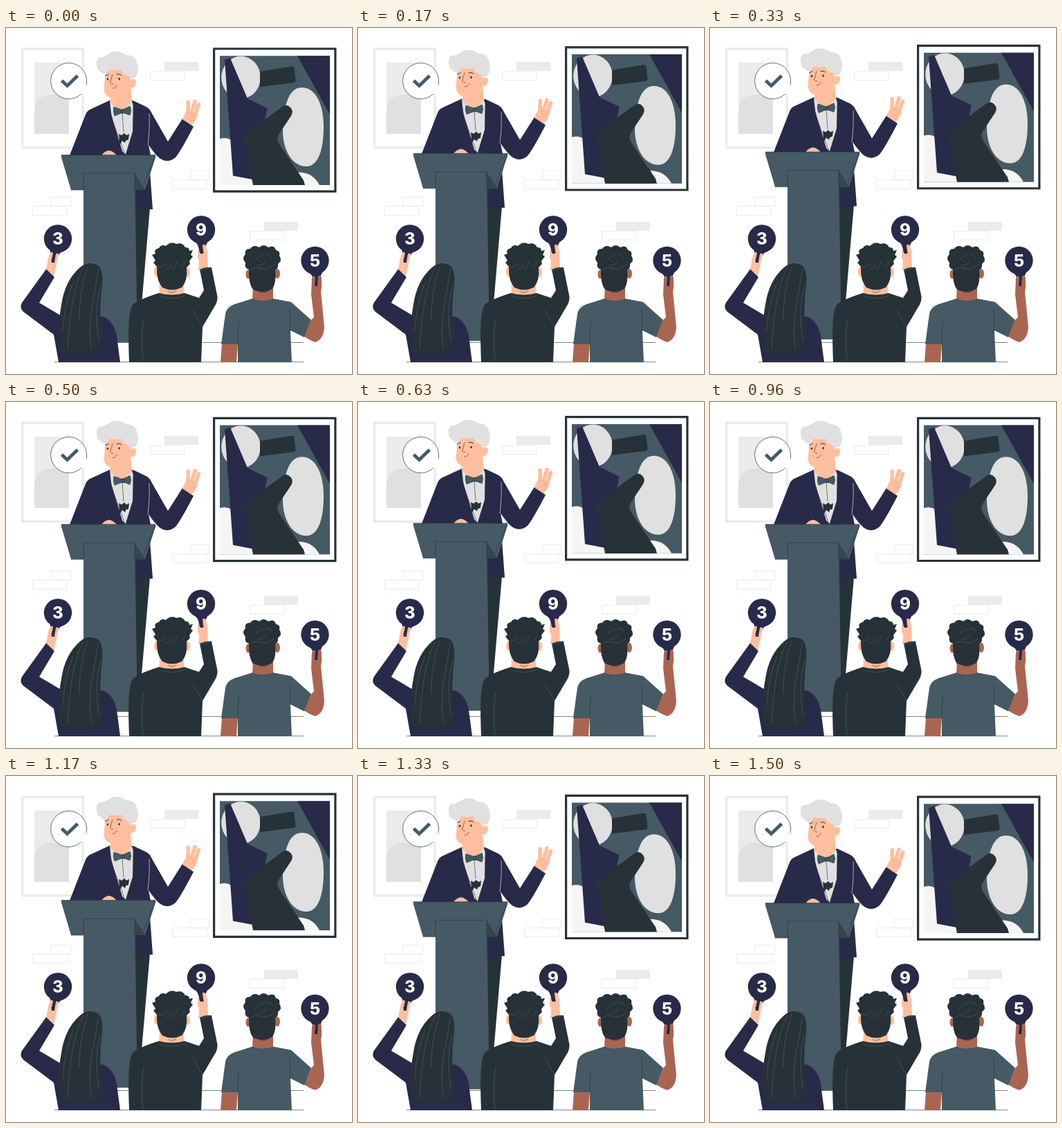
An HTML page for the animation above (1540 ms loop, 500 by 500 pixels).

```html
<!DOCTYPE html>
<html lang="en">
<head>
<meta charset="utf-8">
<title>Auction</title>
<style>
  html, body { margin: 0; height: 100%; overflow: hidden; background: #fff; }
  svg { display: block; width: 100vw; height: 100vh; }
  .slate { fill: #455a64; }
  .dark { fill: #263238; }
  .navy { fill: #282a49; }
  .grey { fill: #e0e0e0; }
  .pale { fill: #f5f5f5; }
  .skin { fill: #ffbe9d; }
  .brown { fill: #aa6550; }
  .line, .soft, .seam, .shade, .feature { fill: none; stroke-width: .6; stroke-linecap: round; }
  .line { stroke: #263238; }
  .soft { stroke: #4d636d; }
  .seam { stroke: #fff; }
  .shade { stroke: #eb996e; }
  .feature { stroke: #263238; stroke-width: 1; }
  .fingers { fill: none; stroke: #ffbe9d; stroke-width: 5.5; stroke-linecap: round; }
  .brick { fill: #fff; stroke: #e6e6e6; stroke-width: .8; }
  .fill { fill: #ebebeb; }
  text { font: 800 24px Inter, "Open Sans", sans-serif; fill: #fff; text-anchor: middle; }
</style>
</head>
<body>
<svg viewBox="0 0 500 500">
  <g id="wall">
    <path class="fill" d="M22 28.500H113V174.500H22Z"/>
    <path fill="#fff" d="M25.500 32H109.500V171H25.500Z"/>
    <path class="fill" d="M41 50H91V153H41Z"/>
    <path class="grey" d="M41 153V120Q42 97 67 96Q82 95 91 105V153Z"/>
    <path class="fill" d="M229 49H278V62H229ZM373 280H422V293H373Z"/>
    <path class="brick" d="M208.500 63H258V75.500H208.500ZM266.500 206.500H293.500V219.500H266.500ZM240.500 219.500H290V232.500H240.500ZM64.500 244.500H94V257.500H64.500ZM38.500 257.500H88V270.500H38.500ZM352.500 293.500H402V306.500H352.500Z"/>
    <path class="line" d="M70 482.700H430M150 454.500H430"/>
  </g>

  <g id="float">
    <g id="painting">
      <path d="M300.600 30H475.900V236.200H300.600Z" fill="#fff" stroke="#263238" stroke-width="3.200"/>
      <path class="slate" d="M309 40.200H468V227H309Z"/>
      <path class="pale" d="M309 160Q318 157 326 162L330 212L357 216V227H309Z"/>
      <path class="pale" d="M414 209Q442 205 453 227H425Z"/>
      <ellipse class="grey" cx="339.500" cy="71.500" rx="28.300" ry="30.700"/>
      <path class="navy" d="M421 40.200H468V125ZM316 46L324 43.500L349 102L377.500 116L374 134L343 155L357 219L328 213.500Z"/>
      <path class="dark" d="M367 63L412 55.500Q416 55 416.500 58L418.500 76Q418.500 78.500 416 79L367 85Z"/>
      <path class="grey" d="M427 86C450 86 459 115 459 143C459 176 451 200 434 200C413 200 400 176 400 148C401 115 407 87 427 86Z"/>
      <path class="dark" d="M343 155L399 114Q406 109 411 115Q416 120 412 127L394 154Q390 160 395 168L430 220L432 227H357Z"/>
    </g>

    <g id="auctioneer">
      <path class="dark" d="M184 255L208 260L196 400L192 454H184Z"/>
      <path class="navy" d="M180 180H206L212 262H184Z"/>
      <path class="navy" d="M150 104.500L124 116.500Q117 119 115 125L92 184H209L206 169Q219 188 226 190.500Q236 195 245 187Q252 179 271 142.500L255 131L234 164L210 122Q208 117 203 114L184 105Z"/>
      <path class="grey" d="M150 105L181 103L184 112L183 150L173 183L168 178L152 125Z"/>
      <path class="line" d="M168 123L170 150M148 107L154 134L172 183M184 107V148L173 183"/>
      <path class="seam" d="M207 124Q208 145 205 169"/>
      <path class="skin" d="M146 57L179 57L180 75Q188 71 188 79Q187 87 180 86L182 106L168 121L151 108V101Q142 98 141.500 88L143 72Z"/>
      <path class="grey" d="M131.500 57Q129 46 135 42Q141 43 146 39Q153 33 163 34Q169 35 173 39Q187 39 189 50Q194 60 187 72Q183 71 180 75L177 69Q169 68 167 60Q156 62 150 60Q147 63 146 69Q139 66 135 62Q132 61 131.500 57Z"/>
      <path class="feature" d="M143.500 69L148 67M160 67Q163 65.500 166.500 68"/>
      <path class="line" d="M154 67L150.500 79Q152 81.500 155 81M154 87Q158 88 160 83"/>
      <ellipse class="dark" cx="147" cy="74" rx="1.200" ry="1.700"/>
      <ellipse class="dark" cx="163.500" cy="73.500" rx="1.200" ry="1.700"/>
      <path class="slate" stroke="#263238" stroke-width=".6" d="M167 118L156 114Q154 120 157 127L167 123L171 123L179 126Q182 119 179 113L171 117Z"/>
      <path class="line" d="M167 118H171V123H167Z"/>
      <path class="skin" d="M255 132Q257 126 260 121L277 122Q277 133 268 140.500Z"/>
      <path class="fingers" d="M263 123L263.300 107M268 122L273 106M274 123L278.500 110.500"/>
      <path class="shade" d="M263 122Q268 120 272 125M268 131L273 126"/>
      <path class="dark" d="M163 153L167 155L171 152L174 155L178 153L177 161L173 163L172 166L168 163L165 168L161 166L164 161Z"/>
      <path class="skin" d="M138 184Q142 178 149 177Q155 178 160 184Z"/>
    </g>

    <g id="podium">
      <path class="dark" d="M186 210L201 234H188L191 454H184Z"/>
      <path class="slate" d="M80 183.500H216V187L201 234H94L80 187Z"/>
      <path fill="#34454d" d="M186 210L201 234H186Z"/>
      <path class="slate" d="M112 210H186L190 454.500H112Z"/>
      <path class="line" d="M80 183.500H216M94 234H112V210H186V234M90 184L94 187M216 185L199 226"/>
    </g>
  </g>

  <g id="bubble">
    <circle cx="90.700" cy="76.500" r="26" fill="#fff" stroke="#263238" stroke-width=".7"/>
    <path fill="#fff" d="M117 83Q115 90 118 95.500Q113 94 109 96L106 90L113 81Z"/>
    <path d="M80.500 76L88.500 83.500L103.500 69" fill="none" stroke="#455a64" stroke-width="4.800"/>
  </g>

  <g id="woman">
    <path class="skin" d="M57 352L62 330Q65 322 69 323L75 326L73 342L68 363Z"/>
    <path class="navy" d="M58 348.500L70 360L48 397L80 416L140 417Q155 422 160 445L165 483H76L69 443L25 410Q19 404 23 397Z"/>
    <path class="dark" d="M107 346Q119 336 133 343Q141 350 139 372Q135 400 137 425Q140 453 138 465Q133 469 127 467Q122 475 111 472Q96 475 77 468Q74 430 80 400Q85 365 107 346Z"/>
    <path class="soft" d="M112 346Q94 375 89 464M118 344Q105 385 106 421M133 350Q128 385 124 402Q119 430 123 463M136 375Q127 410 134 452M97 367Q84 400 82 438"/>
    <path class="line" d="M69 443L77 456M145 450L148 482"/>
  </g>

  <g id="bidder">
    <path class="skin" d="M278 350Q280 337 277 326Q278 313 284 312Q288 309 291 323L292 349Z"/>
    <path class="skin" d="M222 370H257V388Q240 394 221 388Z"/>
    <ellipse class="skin" cx="217.500" cy="352.500" rx="3.500" ry="7"/>
    <ellipse class="skin" cx="262.500" cy="353" rx="3.500" ry="7"/>
    <path class="dark" d="M178 483Q175 414 182 402Q186 394 221 383Q240 388 258 383L279 390L286 379L280 349Q288 345 297 346L305.500 388Q306 396 301 403L284 432L282 483Z"/>
    <path class="dark" d="M218 345L213 339L216 336L211 328L216 326Q213 320 221 318Q224 312 231 315Q238 308 246 312Q255 309 259 317Q265 317 265 322L270 321L267 328L270 330L265 337L266 341L261 346Q263 365 254 375Q240 382 226 375Q217 365 218 345Z"/>
    <path class="soft" d="M219 345Q230 347 231 339M232 348Q238 347 240 340M239 349Q246 345 247 338M253 346Q258 344 258 338M220 387Q240 394 259 387M198 482Q194 445 199 420M284 432L270 407M281 350L293 347"/>
    <path class="line" d="M235 381Q240 384 246 380"/>
  </g>

  <g id="buyer">
    <path class="brown" d="M357 370H386V392Q370 400 356 393ZM312 456H335L333 483H310ZM431 446L441 422L445 418L441 385L442 362Q447 352 454 358Q458 369 455 381L460 432Q459 450 447 454Q438 451 431 446Z"/>
    <ellipse class="brown" cx="350" cy="356" rx="3.500" ry="6.500"/>
    <ellipse class="brown" cx="392" cy="355" rx="4" ry="7"/>
    <path class="slate" d="M311 457L317 413Q319 402 334 398L356 391Q370 397 386 391L412 396L441 422L431 447L411 437L413 483H335V457Z"/>
    <path class="dark" d="M351 349Q344 347 346 339Q340 333 346 327Q344 319 353 319Q358 312 366 317Q372 311 379 317Q388 313 390 321Q397 322 395 329Q400 336 393 341Q394 347 389 350Q391 368 385 377Q371 385 357 378Q350 369 351 349Z"/>
    <path class="soft" d="M354 349Q362 344 368 348Q378 350 388 342M360 337Q364 328 372 329M376 327Q382 326 384 331M364 343Q373 343 376 336"/>
    <path class="line" d="M335 457L336 425M411 437L410 408M366 381Q372 384 379 380"/>
  </g>

  <g id="paddles"></g>
  <path class="skin" d="M60 335L64 325Q67 322 68 326L66 334ZM70 338L72 327Q75 323 76 328L72 342ZM277 333V324Q279 322 281 326L282 334ZM286 330L284 314Q288 310 290 320L290 332Z"/>
  <path class="brown" d="M442 372L443 360Q446 356 447 361L446 373ZM450 373L451 359Q454 355 456 361L455 375Z"/>
</svg>
<script>
  const LOOP = 1540, STEP = LOOP / 37, PERIOD = 1500, RISE = 10;
  const float = document.getElementById('float');

  // Digit, centre, and lower end of the handle
  const paddles = [[3, 75, 304.5, 69, 339], [9, 282, 291.5, 283, 326], [5, 446.500, 336, 449, 373]];
  document.getElementById('paddles').innerHTML = paddles.map(([digit, x, y, hx, hy]) => `
    <path class="navy" d="M${x - 12} ${y + 15}Q${hx - 4} ${y + 20} ${hx - 3} ${hy}H${hx + 3}Q${hx + 5} ${y + 20} ${x + 12} ${y + 15}Z"/>
    <circle class="navy" cx="${x}" cy="${y}" r="20.2"/>
    <text x="${x}" y="${y + 8.5}">${digit}</text>`).join('');

  function draw(now) {
    const time = Math.floor((now % LOOP + 4) / STEP) % 37 * STEP;
    const phase = (time + 20) % PERIOD / PERIOD;
    const y = 0.27 - RISE * (1 - Math.abs(2 * phase - 1));
    float.setAttribute('transform', `translate(0 ${y.toFixed(3)})`);
    requestAnimationFrame(draw);
  }
  draw(performance.now());
</script>
</body>
</html>
```
